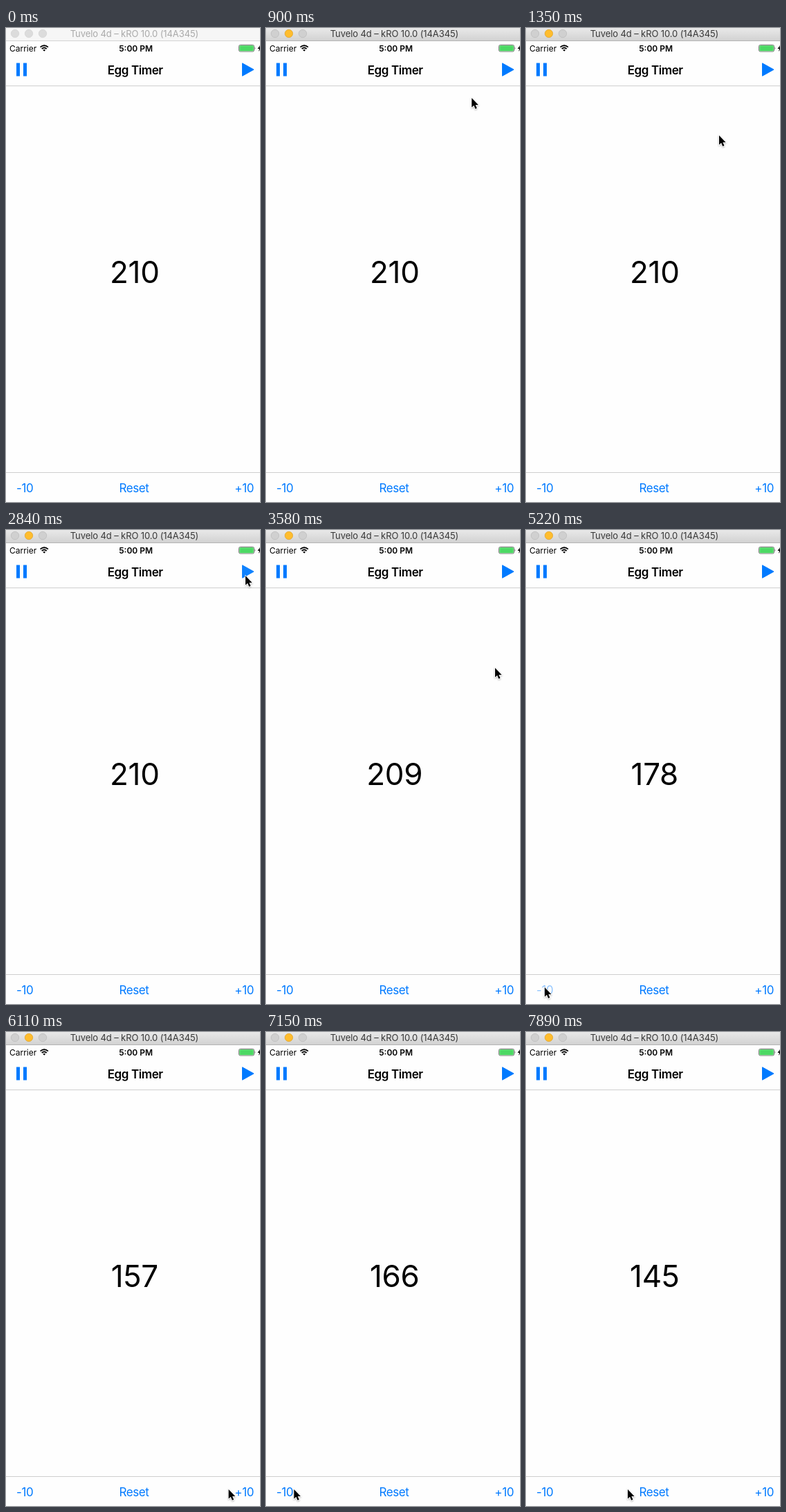
An HTML page that plays this animation: 367 px wide and 684 px high, repeating every 8 s.

```html
<!DOCTYPE html>
<html lang="en">
<head>
<meta charset="utf-8">
<title>Egg Timer</title>
<style>
  html, body { margin: 0; width: 100%; height: 100%; overflow: hidden; background: #fefefe; }
  svg { display: block; width: 367px; height: 684px; font-family: Inter, "Liberation Sans", sans-serif; }
  .small { font-size: 12px; }
  .bold { font-weight: 600; }
  .bar { font-size: 17px; letter-spacing: -.4px; }
  .tint { fill: #007aff; }
  .mid { text-anchor: middle; }
  .end { text-anchor: end; }
</style>
</head>
<body>
<svg viewBox="0 0 367 684">
  <defs>
    <linearGradient id="metal" x2="0" y2="1">
      <stop stop-color="#e9e9e9"/><stop offset="1" stop-color="#d2d2d2"/>
    </linearGradient>
    <filter id="shadow" x="-50%" y="-50%" width="200%" height="200%">
      <feDropShadow dx="0" dy="1" stdDeviation="1" flood-opacity=".35"/>
    </filter>
  </defs>
  <rect width="367" height="684" fill="#fefefe"/>

  <rect id="titleBar" width="367" height="18"/>
  <path id="titleEdge" d="M0 18.5H367"/>
  <g id="lights" stroke-width=".7">
    <circle cx="13" cy="8" r="5.7"/><circle cx="33" cy="8" r="5.7"/><circle cx="53" cy="8" r="5.7"/>
  </g>
  <text id="windowTitle" class="mid" x="185.5" y="13" font-size="13" letter-spacing="-.1">Tuvelo 4d – kRO 10.0 (14A345)</text>

  <text class="small" x="5" y="33.5">Carrier</text>
  <path d="M49.5 27.7Q55.2 22.8 60.9 27.7M51.7 30Q55.2 27 58.7 30" fill="none" stroke="#000" stroke-width="1.7"/>
  <path d="M53.2 31.6Q55.2 30.2 57.2 31.6L55.2 33.7Z"/>
  <text class="small bold mid" x="187.7" y="33.5">5:00 PM</text>
  <rect x="336.5" y="24.5" width="22" height="9.5" rx="2" fill="#fefefe" stroke="#555" stroke-width=".8"/>
  <rect x="337.3" y="25.3" width="20.4" height="7.9" rx="1.2" fill="#4cd964"/>
  <path d="M359.7 27.5q1.6 1.7 0 3.4Z" fill="#444"/>
  <path d="M367 25L363.5 30H366L365 34L369 28.5H366.5Z"/>

  <path d="M0 83.5H367M0 641.5H367" stroke="#cfcfcf"/>
  <path class="tint" d="M15 50.5h5v19h-5ZM25 50.5h5v19h-5Z"/>
  <text class="bar bold mid" x="186.7" y="67">Egg Timer</text>
  <path id="play" class="tint" d="M341.5 50.8L358 60L341.5 69.2Z" stroke="#007aff" stroke-linejoin="round"/>

  <text id="count" class="mid" x="185.8" y="368" font-size="44" letter-spacing="-.3"></text>

  <text id="minus" class="bar tint" x="15" y="670">-10</text>
  <text class="bar tint mid" x="185" y="670">Reset</text>
  <text id="plus" class="bar tint end" x="358" y="670">+10</text>

  <path id="cursor" filter="url(#shadow)" d="M0 0V13.6L3.1 10.8L5.2 15.8L7.5 14.8L5.4 9.9H9.6Z" stroke="#fff" stroke-width="1.3" paint-order="stroke"/>
</svg>
<script>
const LOOP = 8000, STEP = 148.7;
const ENTER = 600, ACTIVATED = 700, COUNTDOWN = 2570;
const FADE = 330;

// The pointer rests between moves.
const entry = { x: 330, y: 4 };
const moves = [
  { from: ENTER, to: 1340, x: 279, y: 155 },
  { from: 1650, to: 2100, x: 346, y: 66 },
  { from: 2840, to: 3120, x: 331, y: 199 },
  { from: 3880, to: 4460, x: 20, y: 678 },
  { from: 4480, to: 4760, x: 27, y: 660 },
  { from: 5670, to: 6240, x: 340, y: 660 },
  { from: 6710, to: 7240, x: 30, y: 660 },
  { from: 7590, to: 7880, x: 147, y: 660 }
];

// Evenly spaced taps; each one adds its amount to the count.
const taps = [
  { button: 'play', at: 2530, gap: 0, times: 1, amount: 0 },
  { button: 'minus', at: 4755, gap: 200, times: 5, amount: -10 },
  { button: 'plus', at: 6400, gap: 0, times: 1, amount: 10 },
  { button: 'minus', at: 7280, gap: 150, times: 2, amount: -10 }
].flatMap(({ button, at, gap, times, amount }) =>
  Array.from({ length: times }, (_, i) => ({ button, amount, at: at + i * gap })));

const $ = id => document.getElementById(id);
const set = (el, attrs) => { for (const k in attrs) el.setAttribute(k, attrs[k]); };
const clamp = v => Math.min(1, Math.max(0, v));
const easeOut = p => 1 - (1 - p) ** 2;

function pointerAt(t) {
  return moves.reduce((p, m) => {
    const k = easeOut(clamp((t - m.from) / (m.to - m.from)));
    return { x: p.x + (m.x - p.x) * k, y: p.y + (m.y - p.y) * k };
  }, entry);
}

function countAt(t) {
  const elapsed = Math.max(0, Math.floor((t - COUNTDOWN) / 1000));
  return taps.reduce((n, tap) => n + (tap.at <= t ? tap.amount : 0), 210 - elapsed);
}

// A tapped button dims, then recovers.
function opacityAt(button, t) {
  const last = taps.findLast(tap => tap.button === button && tap.at <= t);
  return last ? .3 + .7 * clamp((t - last.at) / FADE) : 1;
}

function drawWindow(active) {
  set($('titleBar'), { fill: active ? 'url(#metal)' : '#f6f6f6' });
  set($('titleEdge'), { stroke: active ? '#b4b4b4' : '#d4d4d4' });
  set($('windowTitle'), { fill: active ? '#383838' : '#a9a9a9' });
  [...$('lights').children].forEach((light, i) => {
    const lit = active && i === 1;
    set(light, {
      fill: lit ? '#ffbd2e' : active ? '#d0d0d0' : '#dcdcdc',
      stroke: lit ? '#dfa023' : active ? '#b9b9b9' : '#d2d2d2'
    });
  });
}

function draw(time) {
  const t = ENTER + Math.floor((time - ENTER) / STEP) * STEP;
  drawWindow(t >= ACTIVATED);
  $('count').textContent = countAt(t);
  for (const id of ['play', 'minus', 'plus']) set($(id), { opacity: opacityAt(id, t) });
  const { x, y } = pointerAt(t);
  set($('cursor'), {
    visibility: t >= ENTER ? 'visible' : 'hidden',
    transform: `translate(${x} ${y})`
  });
}

const start = performance.now();
function tick() {
  draw((performance.now() - start) % LOOP);
  requestAnimationFrame(tick);
}
tick();
</script>
</body>
</html>
```
